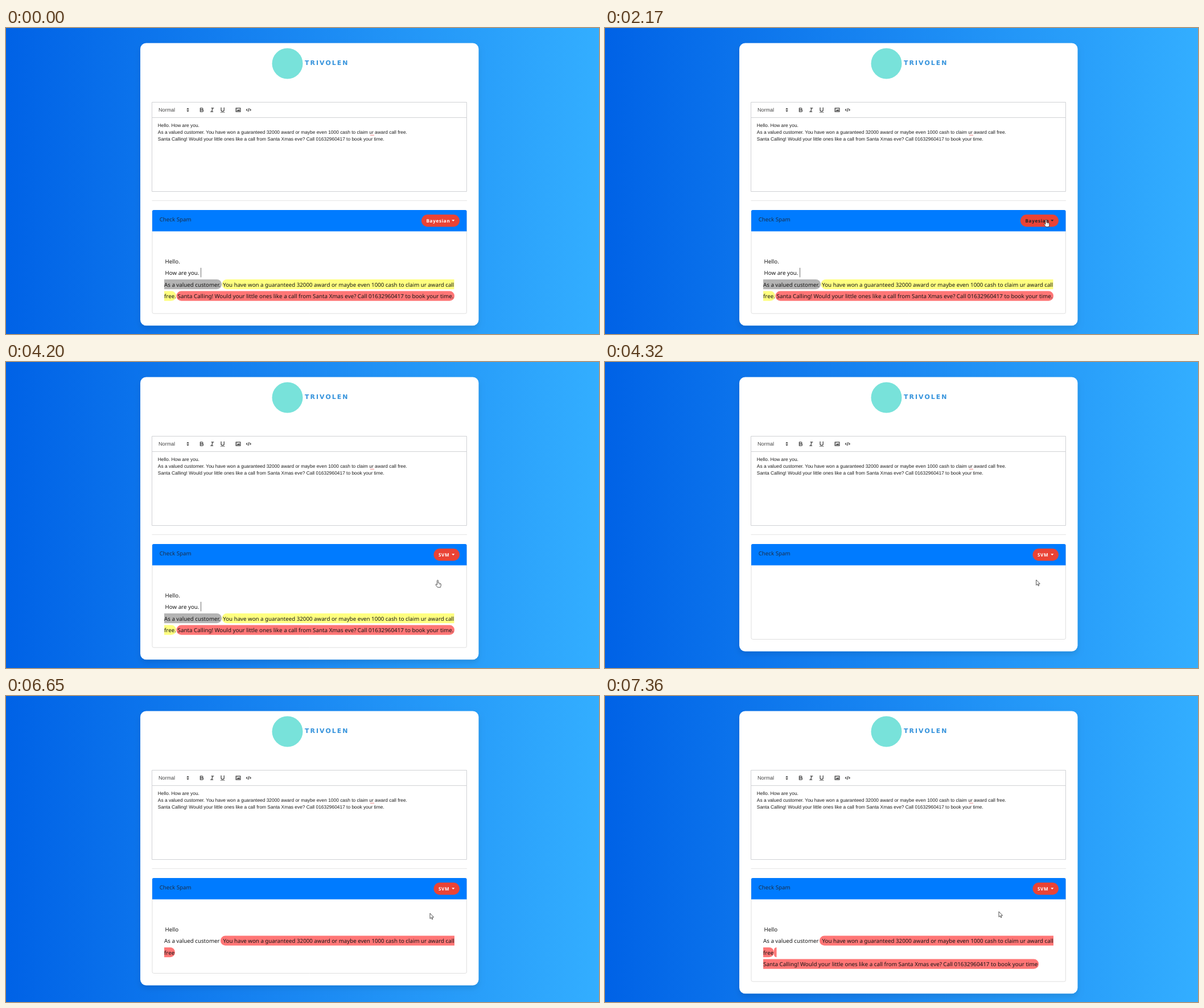
An HTML page with a canvas for the animation above (8 s loop, 1042 by 538 pixels).

```html
<!DOCTYPE html>
<html lang="en">
<head>
<meta charset="utf-8">
<title>Check Spam</title>
<style>
  html, body { margin: 0; width: 100%; height: 100%; overflow: hidden; background: #0062e6; }
  canvas { display: block; width: 1042px; height: 538px; }
</style>
</head>
<body>
<canvas id="stage"></canvas>
<script>
const W = 1042, H = 538, LOOP = 8000;
const canvas = document.getElementById('stage');
const ctx = canvas.getContext('2d');
const dpr = window.devicePixelRatio || 1;
canvas.width = W * dpr;
canvas.height = H * dpr;

const UI = '9.72px "Noto Sans", sans-serif';
const UI_WIDE = '9.84px "Noto Sans", sans-serif';
const BUTTON = 'bold 8.1px "Noto Sans", sans-serif';
const EDITOR = '8.39px "Liberation Sans", Arial, sans-serif';
const INK = '#151515', RED = '#ff7676', YELLOW = '#ffff80', GRAY = '#b4b4b4';
const ROWS = [413.8, 434.3, 454.8, 475.3];
const OFFER = 'You have won a guaranteed 32000 award or maybe even 1000 cash to claim ur award call';
const PHONE = '01632960417';

// Times of the hard changes, in ms.
const ENTER = 480, OPEN = 2550, PRESS = 3780, PICK = 3990, CLEAR = 4210, RELEASE = 4320;
const HELLO = 5360, CUSTOMER = 5710, WON = 6650, SANTA = 7120;

function text(str, x, y, font = UI, color = INK, spacing = 0) {
  ctx.font = font;
  ctx.fillStyle = color;
  ctx.letterSpacing = spacing + 'px';
  ctx.fillText(str, x, y);
}

function box(x, y, w, h, r, fill, stroke) {
  ctx.beginPath();
  ctx.roundRect(x, y, w, h, r);
  if (fill) { ctx.fillStyle = fill; ctx.fill(); }
  if (stroke) { ctx.strokeStyle = stroke; ctx.lineWidth = 1; ctx.stroke(); }
}

function line(x1, y1, x2, y2, color, width = 1) {
  ctx.beginPath();
  ctx.moveTo(x1, y1);
  ctx.lineTo(x2, y2);
  ctx.strokeStyle = color;
  ctx.lineWidth = width;
  ctx.stroke();
}

// Highlighted stretch of a row; left and right are the end radii.
function mark(row, x1, x2, color, left, right) {
  box(x1, ROWS[row] - 12.8, x2 - x1, 17.2, [left, right, right, left], color);
}

// Toolbar icons live in an 18-unit box centred on cx.
const ICON_SCALE = 0.645;
function icon(cx, strokes, fills = '', width = 2) {
  ctx.save();
  ctx.translate(cx - 9 * ICON_SCALE, 144 - 9 * ICON_SCALE);
  ctx.scale(ICON_SCALE, ICON_SCALE);
  ctx.strokeStyle = ctx.fillStyle = '#444';
  ctx.lineWidth = width;
  ctx.lineCap = ctx.lineJoin = 'round';
  ctx.stroke(new Path2D(strokes));
  ctx.fill(new Path2D(fills));
  ctx.restore();
}

function drawBackdrop(bottom) {
  const g = ctx.createLinearGradient(0, 0, W, 0);
  g.addColorStop(0, '#0062e6');
  g.addColorStop(1, '#33aeff');
  ctx.fillStyle = g;
  ctx.fillRect(0, 0, W, H);
  ctx.save();
  ctx.shadowColor = 'rgba(0,0,0,.1)';
  ctx.shadowBlur = 10 * dpr;
  ctx.shadowOffsetY = 5 * dpr;
  box(236, 26.5, 594.5, bottom - 26.5, 10.3, '#fff');
  ctx.restore();
}

function drawBrand() {
  ctx.beginPath();
  ctx.arc(494.5, 62.5, 27, 0, Math.PI * 2);
  ctx.fillStyle = '#78e2da';
  ctx.fill();
  text('TRIVOLEN', 525, 65.3, 'bold 11px "DejaVu Sans", sans-serif', '#3593dc', 2);
}

function drawEditor() {
  box(256.5, 130.5, 553, 157, 0, null, '#d0d2d5');
  line(256.5, 157.5, 809.5, 157.5, '#d0d2d5');
  text('Normal', 268, 147.4, '9.03px "Liberation Sans", Arial, sans-serif', '#444');
  icon(319.5, 'M7 11L9 13L11 11ZM7 7L9 5L11 7Z', 'M7 11L9 13L11 11ZM7 7L9 5L11 7Z');
  icon(344, 'M5 4H9.5A2.5 2.5 0 0 1 9.5 9H5ZM5 9H10.5A2.5 2.5 0 0 1 10.5 14H5Z');
  icon(362.3, 'M7 4H13M5 14H11M8 14L10 4');
  icon(380.6, 'M5 3V9A4 4 0 0 0 13 9V3', 'M3 15H15V16.2H3Z');
  icon(408, 'M3 4H15V14H3Z', 'M5 12V11L7 9L8 10L11 7L13 9V12ZM5 7A1 1 0 0 1 7 7A1 1 0 0 1 5 7');
  icon(426.3, 'M5 7L3 9L5 11M13 7L15 9L13 11M10 5L8 13');

  const ink = '#1c1c1c';
  text('Hello. How are you.', 266.8, 174.2, EDITOR, ink);
  text('As a valued customer. ' + OFFER + ' free.', 266.8, 186, EDITOR, ink);
  text('Santa Calling! Would your little ones like a call from Santa Xmas eve? Call ' + PHONE +
    ' to book your time.', 266.8, 197.8, EDITOR, ink);
  line(640, 188.4, 647, 188.4, '#ee6a6a', 0.8);
  line(256.5, 303.5, 810, 303.5, '#e5e5e5');
}

function drawPanel(bottom, label, dark) {
  box(257, 320.5, 552.5, bottom - 321.5, 2.6, null, '#dfdfdf');
  box(257, 320, 552.5, 37.5, [2.6, 2.6, 0, 0], '#007bff');
  text('Check Spam', 269.7, 340, UI, '#1b2f48');

  const svm = label === 'SVM';
  const left = svm ? 751.5 : 730;
  const color = dark ? '#212529' : '#fff';
  box(left, 328, 797 - left, 21.5, 10.75, '#ea4335');
  text(label, left + 8.4, 341.6, BUTTON, color, 0.7);
  ctx.beginPath();
  ctx.moveTo(783.2, 337.3);
  ctx.lineTo(788.4, 337.3);
  ctx.lineTo(785.8, 339.9);
  ctx.fillStyle = color;
  ctx.fill();
}

function santa(x, end) {
  const y = ROWS[3];
  text('Santa Calling!', x, y, UI_WIDE);
  text('Would your little ones like a call from Santa Xmas eve?', x + 64.9, y, UI_WIDE);
  text('Call ' + PHONE + ' to book your time' + end, x + 316.2, y, UI_WIDE);
}

function drawBayesian() {
  mark(2, 278, 379, GRAY, 0, 8.5);
  mark(2, 379.5, 787.5, YELLOW, 8.5, 0);
  mark(3, 278, 299, YELLOW, 0, 8.5);
  mark(3, 299.5, 788, RED, 8.5, 8.5);
  box(341.8, 421.5, 1.4, 17, 0.7, '#929292');
  text('Hello.', 279.6, ROWS[0]);
  text('How are you.', 279.6, ROWS[1]);
  text('As a valued customer.', 278, ROWS[2]);
  text(OFFER, 381.2, ROWS[2]);
  text('free.', 278, ROWS[3]);
  santa(301.5, '.');
}

function drawSvm(t) {
  if (t >= HELLO) text('Hello', 279.6, ROWS[0]);
  if (t >= CUSTOMER) text('As a valued customer', 278, ROWS[1]);
  if (t >= WON) {
    mark(1, 377, 788, RED, 8.5, 0);
    mark(2, 278, 297, RED, 0, 8.5);
    text(OFFER, 381.5, ROWS[1]);
    text('free', 278, ROWS[2]);
  }
  if (t >= SANTA) {
    mark(2, 297, 301.5, RED, 4.5, 0);
    mark(3, 278, 762, RED, 0, 8.5);
    santa(278, '');
  }
}

function drawMenu() {
  box(730.5, 350.5, 103, 72, 2.6, '#fff', '#d3d6da');
  ['Bayesian', 'SVM', 'Neural Network'].forEach((name, i) =>
    text(name, 746.4, 369.9 + i * 20.5, UI, '#33373b'));
}

const ARROW = new Path2D('M0 0V9.4L2.2 7.5L3.6 10.7L5 10.1L3.7 7H6.6Z');
const HAND = new Path2D('M-1 1a1 1 0 0 1 2 0v4l3.6.8q1.2.3 1.2 1.6v1.9q0 1.5-.9 2.4v1h-5' +
  'l-3.2-4q-.7-1.2.3-1.5q.8-.1 2 1.2z');

// Each move: first and last change, number of steps, end point.
const MOVES = [
  [ENTER, ENTER, 1, 979, 518],
  [630, 740, 2, 858, 372],
  [920, 1000, 2, 785, 322],
  [1090, 1550, 6, 778.5, 331],
  [2060, 2170, 2, 775, 337],
  [2990, 3550, 6, 758.5, 383.5],
  [RELEASE, RELEASE, 1, 757.7, 383],
  [WON, WON, 1, 745, 382],
  [6729, 7360, 9, 692, 379]
];

function pointer(t) {
  let x = MOVES[0][3], y = MOVES[0][4];
  for (const [from, to, n, ex, ey] of MOVES) {
    if (t < from) break;
    const gap = n > 1 ? (to - from) / (n - 1) : 1;
    const p = Math.min(1, (Math.floor((t - from) / gap + 1e-6) + 1) / n);
    x += (ex - x) * p;
    y += (ey - y) * p;
  }
  return { x, y };
}

function drawPointer(p, hand) {
  ctx.save();
  ctx.translate(p.x, p.y);
  ctx.lineJoin = 'round';
  ctx.lineWidth = 0.8;
  ctx.strokeStyle = '#2a2a2a';
  ctx.fillStyle = '#fff';
  const shape = hand ? HAND : ARROW;
  ctx.fill(shape);
  ctx.stroke(shape);
  if (hand) {
    line(2.5, 6.6, 2.5, 8.4, '#555', 0.5);
    line(4.1, 6.9, 4.1, 8.4, '#555', 0.5);
  }
  ctx.restore();
}

function draw(t) {
  ctx.setTransform(dpr, 0, 0, dpr, 0, 0);
  ctx.textRendering = 'geometricPrecision';
  const short = t >= CLEAR && t < SANTA;
  const p = pointer(t);
  const hand = t >= 1000 && t < RELEASE && p.y >= 328;

  drawBackdrop(short ? 508.7 : 523.3);
  drawBrand();
  drawEditor();
  drawPanel(short ? 488.5 : 503, t < PICK ? 'Bayesian' : 'SVM', hand && t < PRESS);
  if (t < CLEAR) drawBayesian();
  else drawSvm(t);
  if (t >= OPEN && t < PICK) drawMenu();
  if (t >= ENTER) drawPointer(p, hand);
}

const start = performance.now();
function tick() {
  draw((performance.now() - start) % LOOP);
  requestAnimationFrame(tick);
}
tick();
</script>
</body>
</html>
```
